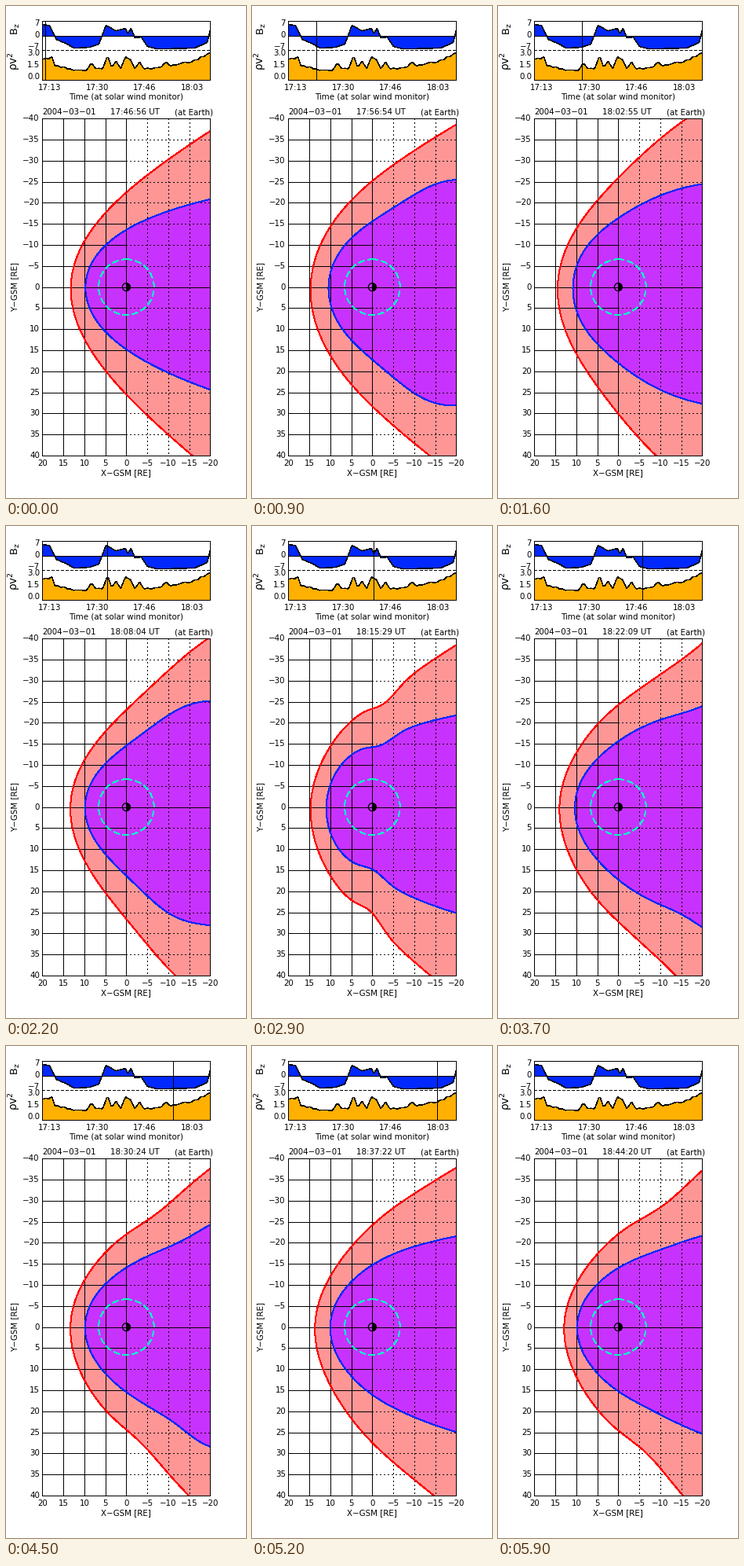
Write a matplotlib script that moves like this. It is 306 by 626 pixels and loops after 6 s.

```python
import numpy as np
import matplotlib.pyplot as plt
from matplotlib.animation import FuncAnimation
from matplotlib.patches import Circle, Polygon, Rectangle, Wedge

W, H, DPI = 306, 626, 64
PT = 72 / DPI                      # points per pixel
FRAMES, INTERVAL = 60, 100

plt.rcParams["font.family"] = "DejaVu Sans"

LEFT, RIGHT, TOP, BOTTOM = 46.5, 260.5, 142.5, 571.5
EARTH = (153.5, 357.5)
SX, SY = (RIGHT - LEFT) / 40, (BOTTOM - TOP) / 80

RED, BLUE = "#ff0000", "#0028ff"
PINK, PURPLE, ORANGE, AQUA = "#ff9696", "#c832ff", "#ffb000", "#00ffc8"
MINUS = "\u2212"

KEYS = [0, 9, 22, 29, 37, 45, 59]
CLOCK = [0, 598, 1268, 1713, 2113, 2608, 3444]     # seconds after 17:46:56
CURSOR = [50, 82, 129, 155, 184, 213, 260]

TILT = 0.066                       # aberration of the solar wind, radians
SPEED, ENTRY = 5, 14               # Earth radii per frame, x where lag is zero

# Solar wind pulses: frame, duration, swelling of outer and inner boundary.
PULSES = np.array([
    (-4, 4, -0.03, -0.08),
    (3.2, 2.3, 0, 0.42),
    (11, 4.5, 0.25, 0.3),
    (16.7, 2, 0.1, 0.38),
    (26, 0.8, -0.16, -0.2),
    (28.7, 1.7, 0.2, 0.42),
    (33, 3, 0, 0.2),
    (36, 2, 0.12, 0.04),
    (38, 1.5, 0, 0.3),
    (41.3, 1.6, -0.13, 0),
    (50, 2.5, 0.1, 0.08),
    (54.6, 1.6, -0.14, -0.05),
    (59.5, 0.8, -0.1, 0),
])


class Boundary:
    """Parabola-like curve; each pulse swells it while drifting tailward."""

    def __init__(self, column, rest, nose, stiffness, curve):
        self.gain, self.rest = PULSES[:, column], rest
        self.base_nose, self.stiffness, self.curve = nose, stiffness, curve

    def swell(self, frame, x):
        time = frame - (ENTRY - np.atleast_1d(x)) / SPEED
        z = (time[:, None] - PULSES[:, 0]) / PULSES[:, 1]
        return self.rest + np.exp(-z * z) @ self.gain

    def points(self, frame):
        nose = self.base_nose * self.swell(frame, self.base_nose)[0] ** self.stiffness
        depth = (nose + 28) * np.linspace(0, 1, 140) ** 2
        x = nose - depth
        a, b = self.curve
        y = np.sqrt(self.swell(frame, x) * depth * (a + b * depth))
        x = np.concatenate([x[::-1], x])
        y = np.concatenate([-y[::-1], y])
        c, s = np.cos(TILT), np.sin(TILT)
        return np.column_stack([EARTH[0] - SX * (x * c + y * s),
                                EARTH[1] + SY * (y * c - x * s)])


def bz_trace():
    pts = [(46, 23), (55, 24), (64, 42), (78, 48), (86, 53), (106, 52),
           (118, 48), (127, 24), (140, 31), (152, 28), (155, 34), (159, 28),
           (164, 40), (172, 39), (180, 51), (192, 54), (240, 53), (256, 46),
           (260, 30)]
    return np.array(pts).T + 0.5


def pressure_trace():
    """Slow trend with narrow peaks and a little seeded jitter."""
    trend = [(46, 66), (58, 65), (62, 75), (90, 81), (122, 79), (180, 79),
             (215, 75), (245, 67), (260, 58)]
    peaks = [(109, 9), (129, 18), (140, 9), (152, 16), (158, 11), (170, 9),
             (204, 6)]
    x = np.arange(46, 261, 2.0)
    y = np.interp(x, *np.array(trend).T)
    for center, height in peaks:
        y -= height * np.clip(1 - abs(x - center) / 6, 0, 1)
    jitter = np.random.default_rng(4).uniform(-1.5, 1.5, len(x) // 2 + 1)
    y += np.interp(x, np.linspace(46, 260, len(jitter)), jitter)
    return x + 0.5, y + 0.5


def line(x, y, color="black", width=1, **kw):
    return ax.plot(x, y, color=color, lw=width * PT, aa=False, **kw)[0]


def label(x, y, s, ha="center", size=10.3, **kw):
    return ax.text(x, y, s, ha=ha, va="center", fontsize=size * PT, **kw)


def signed(n):
    return str(n).replace("-", MINUS)


def frame_box(x0, y0, x1, y1):
    line([x0, x1, x1, x0, x0], [y0, y0, y1, y1, y0], zorder=9)


def draw_trace(xy, base, color):
    x, y = xy
    ax.fill_between(x, y, base, color=color, lw=0, aa=False)
    line(x, y, width=0.4)


def draw_wind():
    draw_trace(bz_trace(), 37.5, BLUE)
    draw_trace(pressure_trace(), 93.5, ORANGE)
    line([LEFT, RIGHT], [37.5, 37.5])
    line([LEFT, RIGHT], [55.5, 55.5], ls=(0, (3, 2)), dash_capstyle="butt")
    frame_box(LEFT, 18.5, RIGHT, 93.5)
    for i, (bz, pressure) in enumerate(zip(["7", "0", MINUS + "7"],
                                           ["3.0", "1.5", "0.0"])):
        label(43, 22 + 15 * i, bz, "right")
        label(43, 60 + 15 * i, pressure, "right")
    for i, s in enumerate(["17:13", "17:30", "17:46", "18:03"]):
        label(56 + 60.5 * i, 104, s)
    label(153, 115, "Time (at solar wind monitor)")
    label(13, 29, "B$_\\mathrm{z}$", size=13, rotation=90)
    label(10, 70, "\u03c1v$^\\mathrm{2}$", size=13.5, rotation=90)


def draw_grid():
    solid = dict(zorder=4)
    dots = dict(ls=(0, (1, 3)), dash_capstyle="butt", zorder=4)
    mid = EARTH[0]
    for n in range(-40, 41, 5):
        y = EARTH[1] + n * SY
        line([LEFT, mid], [y, y], **solid)
        line([mid, RIGHT], [y, y], **(dots if n else solid))
        label(43, y, signed(n), "right")
    for n in range(20, -21, -5):
        x = mid - n * SX
        line([x, x], [TOP, BOTTOM], **(dots if n < 0 else solid))
        label(x, 582, signed(n))
    frame_box(LEFT, TOP, RIGHT, BOTTOM)
    label(153, 594, f"X{MINUS}GSM [RE]")
    label(11, 357, f"Y{MINUS}GSM [RE]", rotation=90)


def draw_earth():
    ax.add_patch(Circle(EARTH, 6.6 * SX, fill=False, ec=AQUA, lw=PT,
                        ls=(0, (7, 4)), capstyle="butt", aa=False, zorder=6))
    ax.add_patch(Circle(EARTH, 5, fill=False, ec="black", lw=1.3 * PT, zorder=7))
    ax.add_patch(Wedge(EARTH, 5, -90, 90, fc="black", lw=0, zorder=7))


def layer(fill, edge, z):
    area = Polygon([[0, 0], [1, 1], [1, 0]], fc=fill, lw=0, aa=False, zorder=z)
    ax.add_patch(area)
    rim = line([], [], edge, zorder=5)
    for art in (area, rim):
        art.set_clip_path(plot_area)
    return area, rim


fig = plt.figure(figsize=(W / DPI, H / DPI), dpi=DPI, facecolor="white")
ax = fig.add_axes([0, 0, 1, 1])
# The small offset makes half-pixel positions snap to the intended pixel.
ax.set_xlim(0.1, W + 0.1)
ax.set_ylim(H - 0.1, -0.1)
ax.axis("off")
ax.set_autoscale_on(False)

plot_area = Rectangle((LEFT, TOP), RIGHT - LEFT, BOTTOM - TOP,
                      transform=ax.transData)
draw_wind()
draw_grid()
draw_earth()
label(46, 135, f"2004{MINUS}03{MINUS}01", "left")
label(215, 135, "(at Earth)", "left")
clock = label(133, 135, "", "left")
cursor = line([50.5, 50.5], [18.5, 93.5], zorder=8)

layers = [
    (Boundary(2, 1.0, 13.3, 0.55, (41, 0.25)), layer(PINK, RED, 2)),
    (Boundary(3, 1.05, 9.65, 0.35, (23, -0.2)), layer(PURPLE, BLUE, 3)),
]


def update(frame):
    sec = 64016 + round(np.interp(frame, KEYS, CLOCK))
    clock.set_text(f"{sec // 3600}:{sec // 60 % 60:02d}:{sec % 60:02d} UT")
    x = round(np.interp(frame, KEYS, CURSOR)) + 0.5
    cursor.set_xdata([x, x])
    for boundary, (area, rim) in layers:
        pts = boundary.points(frame)
        rim.set_data(pts[:, 0], pts[:, 1])
        area.set_xy(pts)
    return []


anim = FuncAnimation(fig, update, frames=FRAMES, interval=INTERVAL,
                     init_func=lambda: update(0), repeat=True)
plt.show()
```
